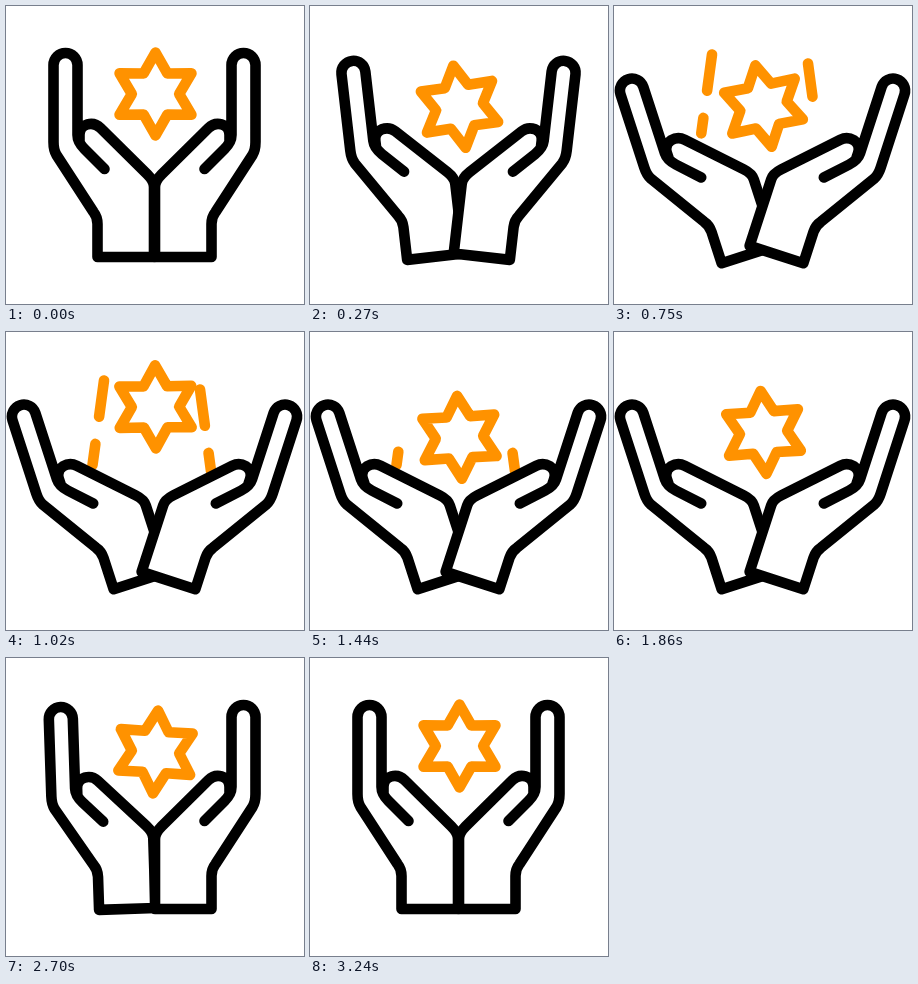
An HTML page with a canvas for the animation above (3.6 s loop, 298 by 298 pixels).

```html
<!DOCTYPE html>
<html>
<head>
<meta charset="utf-8">
<style>
html, body { margin: 0; width: 100%; height: 100%; overflow: hidden; background: #fff; }
canvas { display: block; }
</style>
</head>
<body>
<canvas width="298" height="298"></canvas>
<script>
const ctx = document.querySelector('canvas').getContext('2d');
const ORANGE = '#ff9200';
const LOOP = 3600, STEP = 30, LAST = 108;

const hand = new Path2D(
  'M99 163 L79 143 Q72 136 72 129 V59 A12 12 0 0 0 48 59 V136 Q48 144 51 149 ' +
  'L88 206 Q92 211 92 218 V251 H148.5 V181 Q148.5 175 142 168.5 ' +
  'L95 122 C88 115 74 117 74 129 V136');

const star = new Path2D();
for (let i = 0; i < 12; i++) {
  const r = i % 2 ? 23.7 : 41.5, a = i * Math.PI / 6;
  star.lineTo(r * Math.sin(a), -r * Math.cos(a));
}
star.closePath();

// Eased progress from 0 to 1 between steps a and b
function ease(n, a, b) {
  const u = Math.min(1, Math.max(0, (n - a) / (b - a)));
  return u * u * (3 - 2 * u);
}

// Evenly spaced keys, 18 steps apart
function keyed(keys, n) {
  const i = Math.min(Math.floor(n / 18), keys.length - 2);
  return keys[i] + (keys[i + 1] - keys[i]) * ease(n, i * 18, i * 18 + 18);
}

const BOB = [0, 25.5, -14.5, 28.5, -10, 6, 0];
const TILT = [0, -17, 0, -4.5, -3.4, 3.5, 0];

function drawStar(n) {
  ctx.save();
  ctx.translate(149.5, 88 + keyed(BOB, n));
  ctx.rotate(keyed(TILT, n) * Math.PI / 180);
  ctx.stroke(star);
  ctx.restore();
}

// Broken line, visible only between the fractions from and to
function drawTrail(x1, y1, x2, y2, from, to) {
  const len = Math.hypot(x2 - x1, y2 - y1);
  const point = d => [x1 + (x2 - x1) * d / len, y1 + (y2 - y1) * d / len];
  for (const [a, b] of [[0, 36.5], [64, len]]) {
    const s = Math.max(a, from * len), e = Math.min(b, to * len);
    if (e <= s) continue;
    ctx.beginPath();
    ctx.moveTo(...point(s));
    ctx.lineTo(...point(e));
    ctx.stroke();
  }
}

function drawHand(degrees, mirrored) {
  ctx.save();
  ctx.translate(-0.5, 0);
  if (mirrored) {
    ctx.translate(298, 0);
    ctx.scale(-1, 1);
  }
  ctx.translate(120, 203);
  ctx.rotate(-degrees * Math.PI / 180);
  ctx.translate(-120, -203);
  ctx.fill(hand);
  ctx.stroke(hand);
  ctx.restore();
}

function draw(n) {
  ctx.fillStyle = '#fff';
  ctx.fillRect(0, 0, 298, 298);
  ctx.lineWidth = 10.6;
  ctx.lineCap = ctx.lineJoin = 'round';

  ctx.strokeStyle = ORANGE;
  drawTrail(98, 48.5, 86.5, 133, ease(n, 36, 52), ease(n, 9, 28));
  drawTrail(194, 57.5, 205, 139, ease(n, 37, 54), ease(n, 18, 34));
  drawStar(n);

  ctx.strokeStyle = '#000';
  const open = ease(n, 0, 22);
  drawHand(18 * (open - ease(n, 72, 94.5)), false);
  drawHand(18 * (open - ease(n, 63, 85)), true);
}

function tick() {
  draw(Math.min(LAST, Math.floor(performance.now() % LOOP / STEP)));
  requestAnimationFrame(tick);
}
tick();
</script>
</body>
</html>
```
